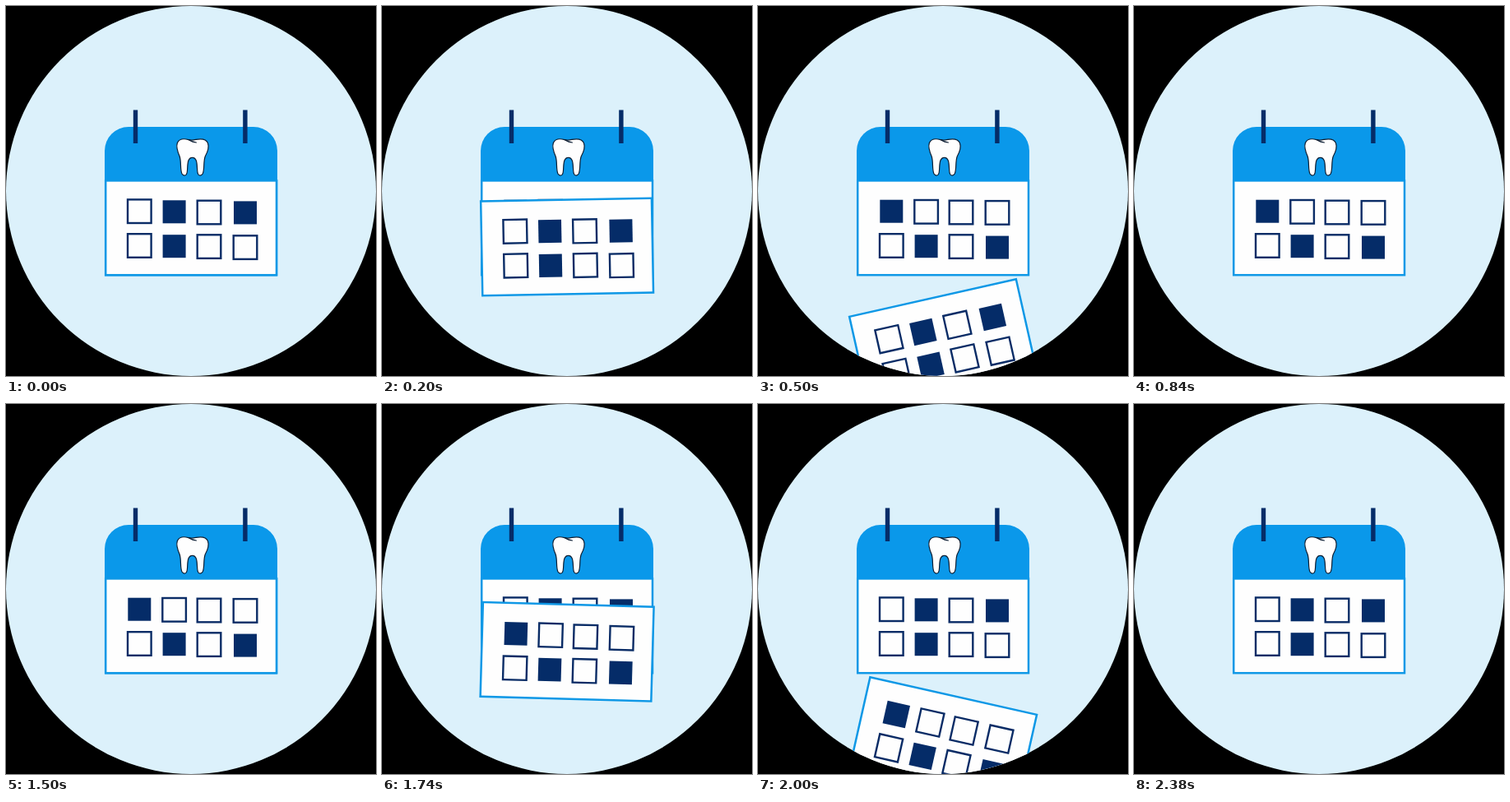
An HTML page that plays this animation: 450x450 px, repeating every 2420 ms.

```html
<!DOCTYPE html>
<html lang="en">
<head>
<meta charset="utf-8">
<title>Calendar</title>
<style>
  html, body { margin: 0; width: 100%; height: 100%; overflow: hidden; background: #000; }
  svg { display: block; width: 100%; height: 100%; }
  .sheet { fill: #fefefe; stroke: #0f98e6; stroke-width: 2.5; }
  .open { fill: none; stroke: #0a2c66; stroke-width: 2.4; }
  .full, .hook { fill: #052c68; }
  .head { fill: #0a98ea; }
  .tooth { fill: #fefefe; stroke: #0c1e33; stroke-width: 1.2; stroke-linejoin: round; stroke-linecap: round; }
</style>
</head>
<body>
<svg viewBox="0 0 450 450">
  <defs>
    <clipPath id="disc"><circle cx="225" cy="225" r="225"/></clipPath>
    <g id="pageA"></g>
    <g id="pageB"></g>
  </defs>
  <circle cx="225" cy="225" r="225" fill="#dcf1fb"/>
  <g clip-path="url(#disc)">
    <use id="base" href="#pageB"/>
    <path class="head" d="M120 213V176A29 29 0 0 1 149 147H301A29 29 0 0 1 330 176V213Z"/>
    <rect class="hook" x="154.8" y="126.5" width="5.4" height="40.5"/>
    <rect class="hook" x="288.2" y="126.5" width="5.4" height="40.5"/>
    <path class="tooth" d="M222 162.6C216 161 210.5 161.8 208.4 166.5C206.5 171.5 209 178 211.2 183C213.4 190 211.5 199 214 204C216 207.2 219.5 206.6 220.2 202.5C221.4 196 219.5 184.3 226.6 184.3C233.7 184.3 231.8 196 233 202.5C233.7 206.6 237.2 207.2 239.2 204C241.7 199 239.8 190 242.2 183C245 178 247.3 171.5 245.4 166.5C243.3 161.8 237 161.2 231 162.4C228 163.2 225 163.4 222 162.6Z"/>
    <path class="tooth" style="fill:none" d="M222 162.6C225 164.6 228 166 231.5 166"/>
    <use id="fall" href="#pageA"/>
  </g>
</svg>
<script>
const LOOP = 2420, FPS = 30;
const CX = 225, CY = 269.8;
const COLS = [162.3, 204.6, 247, 291];
const ROWS = [[249.7, 250.3, 251, 251.4], [291.5, 292.2, 292.6, 293.6]];
const $ = id => document.getElementById(id);

const square = (x, y, size, kind) =>
  `<rect class="${kind}" x="${x - size / 2}" y="${y - size / 2}" width="${size}" height="${size}"/>`;

// marks: one character per cell, "#" is a filled day
function buildPage(id, marks) {
  let html = '<rect class="sheet" x="121.2" y="212.4" width="207.8" height="114.8"/>';
  ROWS.forEach((row, r) => row.forEach((y, c) => {
    const full = marks[r][c] === "#";
    html += square(COLS[c], y, full ? 28 : 28.6, full ? "full" : "open");
  }));
  $(id).innerHTML = html;
}

buildPage("pageA", [".#.#", ".#.."]);
buildPage("pageB", ["#...", ".#.#"]);

const drops = [
  { start: 0, page: "#pageA", under: "#pageB", turn: -12.7 },
  { start: 1500, page: "#pageB", under: "#pageA", turn: 12.7 }
];

function draw(now) {
  const t = now % LOOP;
  const step = Math.floor(t * FPS / 1000 + 1e-6) * 1000 / FPS;
  const drop = drops[t < drops[1].start ? 0 : 1];
  const u = Math.max(0, step - drop.start) / 500;
  const dy = 141.2 * u ** 1.97;
  const angle = drop.turn * u ** 2.7;
  $("base").setAttribute("href", drop.under);
  $("fall").setAttribute("href", drop.page);
  $("fall").setAttribute("transform", `translate(0 ${dy}) rotate(${angle} ${CX} ${CY})`);
  $("fall").setAttribute("visibility", u < 1.6 ? "visible" : "hidden");
}

function tick() {
  draw(performance.now());
  requestAnimationFrame(tick);
}
tick();
</script>
</body>
</html>
```
